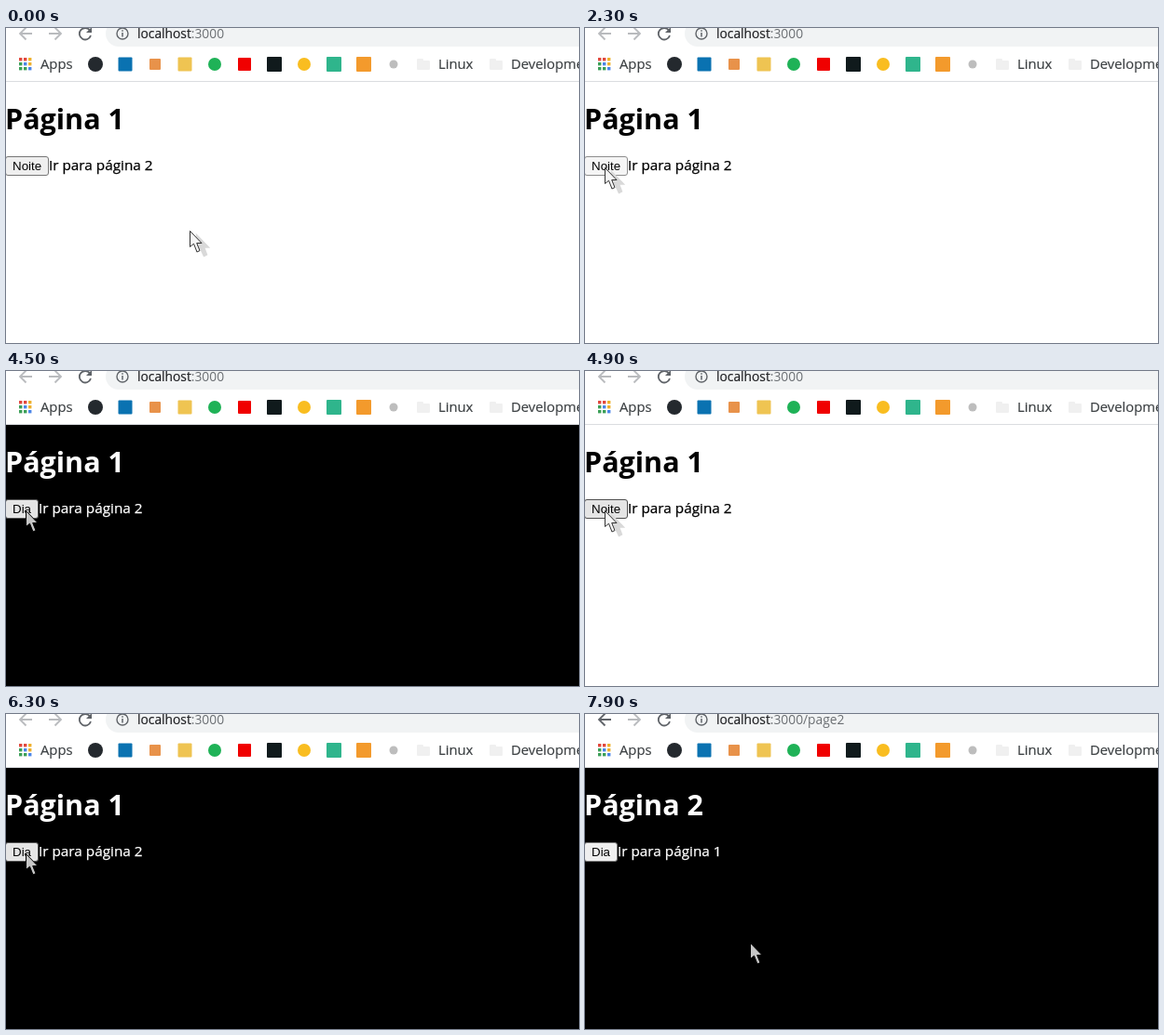
An HTML page that plays this animation: 615 by 339 pixels, repeating every 8000 ms.

```html
<!DOCTYPE html>
<html lang="pt">
<head>
<meta charset="utf-8">
<style>
  html, body { margin: 0; width: 100%; height: 100%; overflow: hidden; background: #fff; }
  svg { display: block; font-family: "Open Sans", sans-serif; }
  .line { fill: none; stroke-width: 1.8; }
  .gray { stroke: #b9bbbe; }
  .dark { stroke: #5f6368; }
</style>
</head>
<body>
<svg width="615" height="339" viewBox="0 0 615 339">
  <defs><filter id="blur"><feGaussianBlur stdDeviation="0.4"/></filter></defs>

  <rect id="page" y="58" width="615" height="281"/>
  <rect y="57" width="615" height="1" fill="#dadce0"/>

  <rect x="107" y="-8" width="540" height="28" rx="14" fill="#f1f3f4"/>
  <path id="back" class="line" d="M28 6H15M21.5 -.5L15 6l6.500 6.500"/>
  <path class="line gray" d="M46 6H59M52.500 -.5L59 6l-6.500 6.500"/>
  <path class="line dark" d="M90 2.500A6.200 6.200 0 1 0 91 8"/>
  <path d="M92 -1V5H86Z" fill="#5f6368"/>
  <circle class="line dark" cx="125" cy="6" r="6" style="stroke-width:1.400"/>
  <path class="line dark" d="M125 5V9.500M125 2.200V3.800" style="stroke-width:1.500"/>
  <text x="141" y="11" font-size="13.8" fill="#202124" stroke="#202124" stroke-width=".2">localhost<tspan id="path" fill="#6b6f73" stroke="none"></tspan></text>

  <g id="bookmarks"></g>
  <g font-size="14.8" fill="#3c4043" stroke="#3c4043" stroke-width=".2">
    <text x="37" y="44">Apps</text>
    <text x="464" y="44">Linux</text>
    <text x="542" y="44">Development</text>
  </g>

  <text id="title" x="-1" y="109" font-size="30.5" font-weight="700"></text>
  <rect id="button" x="-.5" y="138.5" height="20" rx="2.5"/>
  <text id="label" x="7" y="153" font-size="13.333" font-family="Liberation Sans, Arial, sans-serif"></text>
  <text id="link" y="152.500" font-size="15.3" stroke-width=".25"></text>

  <g id="cursor">
    <path id="shadow" d="M0 0V18L4 14.500 8 23 11 21.500 8 13.500H13Z" transform="translate(7.500 4.500)" fill="#d9d9d9" stroke="#d9d9d9" stroke-width="1.5" filter="url(#blur)"/>
    <path id="arrow" d="M.5 .5V17.500L4.500 14.200 8 23 11 21.600 7.700 13.500H13Z"/>
  </g>
</svg>
<script>
const LOOP = 8000, STEP = 100;
const el = id => document.getElementById(id);
const set = (id, attrs) => {
  for (const name in attrs) el(id).setAttribute(name, attrs[name]);
};

// Bookmark icons: centre x, size, colour, round
const icons = [
  [96, 16, '#24292e', true], [128, 15, '#0a72b1'], [160, 12, '#e8924a'],
  [192, 15, '#efc452'], [224, 14, '#1fb257', true], [256, 14, '#f00000'],
  [288, 16, '#101a1c'], [320, 14, '#f9bd20', true], [352, 16, '#2fb58c'],
  [384, 16, '#f39a2c'], [416, 9, '#bdbdbd', true]
];
const box = (x, y, w, h, fill, r = 0) =>
  `<rect x="${x}" y="${y}" width="${w}" height="${h}" rx="${r}" fill="${fill}"/>`;
const folder = x => box(x, 33, 7, 4, '#f0f0f0', 1) + box(x, 35, 14, 10, '#f0f0f0', 1);
const [red, yellow, green, blue] = ['#e2483d', '#eeb02c', '#3b9f57', '#4b86e8'];
const dots = [red, red, yellow, green, blue, yellow, green, green, blue];

el('bookmarks').innerHTML =
  dots.map((c, i) => box(14 + i % 3 * 5, 32 + (i / 3 | 0) * 5, 3.4, 3.4, c)).join('') +
  icons.map(([x, s, c, round]) => box(x - s / 2, 39 - s / 2, s, s, c, round ? s / 2 : 1)).join('') +
  folder(441) + folder(519);

// Pointer samples: time, x, y
const moves = [
  [0, 197, 218], [100, 197, 219], [400, 180, 211], [600, 135, 203],
  [700, 72, 190], [800, 21, 174], [900, 29, 167], [1100, 21, 150],
  [6800, 34, 150], [6900, 62, 150], [7000, 88, 149], [7100, 101, 148],
  [7400, 106, 156], [7500, 120, 178], [7600, 140, 205],
  [7700, 160, 228], [7800, 173, 241], [7900, 177, 246]
];
const clicks = [2300, 4800, 6200];

function draw(t) {
  const night = clicks.filter(c => t >= c + STEP).length % 2 === 1;
  const pressed = clicks.some(c => t >= c && t < c + STEP);
  const hover = t >= 1100 && t < 6800;
  const second = t >= 7300;
  const ink = night ? '#fff' : '#000';
  const right = night ? 35 : 46;
  const [, x, y] = moves.filter(m => m[0] <= t).pop();

  set('page', { fill: night ? '#000' : '#fff' });
  set('back', { class: 'line ' + (second ? 'dark' : 'gray') });
  el('path').textContent = second ? ':3000/page2' : ':3000';
  el('title').textContent = second ? 'Página 2' : 'Página 1';
  set('title', { fill: ink });
  set('button', {
    width: right,
    fill: pressed ? '#f5f5f5' : hover ? '#e5e5e5' : '#efefef',
    stroke: pressed ? '#8d8d8d' : hover ? '#4f4f4f' : '#767676'
  });
  el('label').textContent = night ? 'Dia' : 'Noite';
  el('link').textContent = 'Ir para página ' + (second ? 1 : 2);
  set('link', { x: right, fill: ink, stroke: ink });
  set('cursor', { transform: `translate(${x} ${y})` });
  set('arrow', { fill: night ? '#c6c6c6' : '#f6f6f6', stroke: night ? '#000' : '#333' });
  set('shadow', { visibility: night ? 'hidden' : 'visible' });
}

const start = performance.now();
function tick() {
  draw((performance.now() - start) % LOOP);
  requestAnimationFrame(tick);
}
tick();
</script>
</body>
</html>
```
